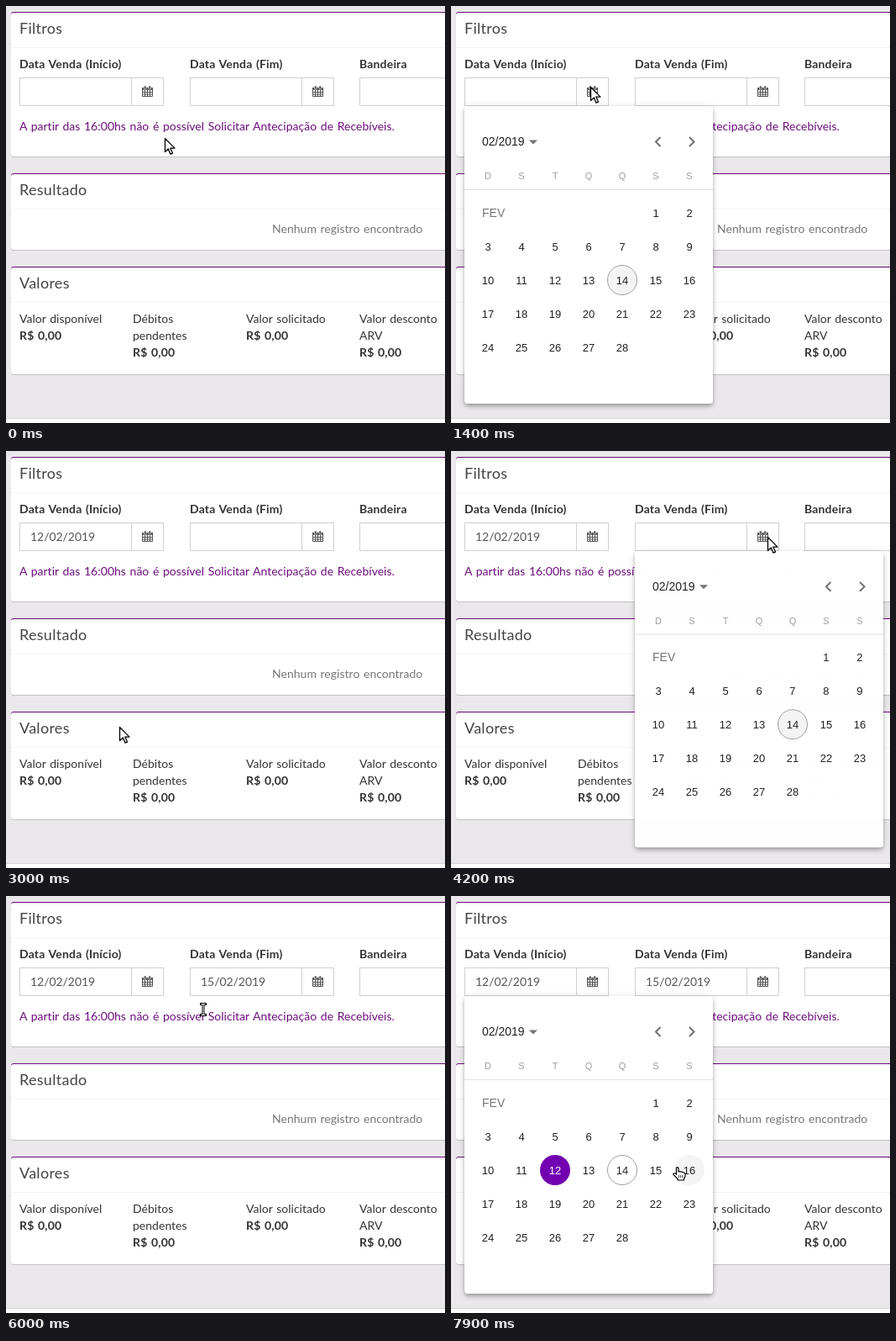
Write an HTML page that moves like this. It is 523 by 496 pixels and loops after 8 s.

```html
<!DOCTYPE html>
<html lang="pt">
<head>
<meta charset="utf-8">
<title>Filtros</title>
<style>
html, body { margin: 0; width: 100%; height: 100%; overflow: hidden; background: #eae8eb; }
svg { display: block; width: 523px; height: 496px; }
text { font: 14px Lato, "Open Sans", sans-serif; fill: #333; letter-spacing: .02px; word-spacing: 1px; white-space: pre; }
.bold { font-weight: 700; letter-spacing: .17px; }
.title { font-size: 18px; fill: #444; letter-spacing: .28px; }
.note { fill: #6c0f7c; }
.mute { fill: #777; }
.value { fill: #555; letter-spacing: -.05px; }
.cal text { font: 13px "Liberation Sans", Arial, sans-serif; fill: #212121; letter-spacing: 0; word-spacing: 0; }
.cal .month { font-size: 14px; }
.cal .week { font-size: 11px; fill: #9e9e9e; }
.cal .name { font-size: 14px; fill: #757575; }
.mid { text-anchor: middle; }
</style>
</head>
<body>
<svg id="stage" viewBox="0 0 523 496"></svg>
<script>
const stage = document.getElementById('stage');

function add(parent, tag, attrs, text) {
  const node = document.createElementNS('http://www.w3.org/2000/svg', tag);
  for (const key in attrs) node.setAttribute(key, attrs[key]);
  if (text) node.textContent = text;
  parent.appendChild(node);
  return node;
}
const rect = (parent, x, y, width, height, fill, more) =>
  add(parent, 'rect', { x, y, width, height, fill, ...more });
const label = (parent, x, y, text, cls = '') => add(parent, 'text', { x, y, class: cls }, text);
const path = (parent, d, more) => add(parent, 'path', { d, fill: 'none', ...more });
const show = (node, on) => node.setAttribute('visibility', on ? 'inherit' : 'hidden');

const defs = add(stage, 'defs');
for (const size of [.5, 2, 2.5, 5]) {
  const blur = add(defs, 'filter', { id: 'blur' + size * 10, x: '-20%', y: '-20%', width: '140%', height: '140%' });
  add(blur, 'feGaussianBlur', { stdDeviation: size });
}

// Page
function panel(top, bottom, title) {
  const shape = { rx: 3 };
  rect(stage, 6, top + 1, 530, bottom - top, '#000', { ...shape, opacity: .16, filter: 'url(#blur5)' });
  rect(stage, 6, top, 530, 8, '#6a0c78', shape);
  rect(stage, 6, top + 1, 530, bottom - top - 1, '#fff', shape);
  rect(stage, 6, top + 42, 530, 1, '#f4f4f4');
  label(stage, 16, top + 26, title, 'title');
}

function icon(x) {
  const g = add(stage, 'g', { transform: `translate(${x} 95)`, fill: '#555' });
  path(g, 'M.5 2.5H12.5V12.5H.5Z M3.5 5V12 M6.5 5V12 M9.5 5V12 M1 7.5H12 M1 10H12',
    { stroke: '#555' });
  rect(g, 0, 2, 13, 3);
  for (const left of [2.5, 8]) rect(g, left, 0, 2.5, 4, '#555', { stroke: '#fff', 'stroke-width': .5 });
}

function field(x, title) {
  label(stage, x, 74, title, 'bold');
  const line = { stroke: '#d0d0d0' };
  rect(stage, x + .5, 85.5, 171, 33, '#fff', line);
  path(stage, `M${x + 133.5} 85V119`, line);
  icon(x + 146);
  return label(stage, x + 13, 107, '', 'value');
}

rect(stage, 0, 0, 523, 496, '#eae8eb');
rect(stage, 0, 490, 523, 6, '#fff');
rect(stage, 0, 490, 523, 1, '#d2d2d8');
panel(7, 179, 'Filtros');
panel(199, 290, 'Resultado');
panel(310, 438, 'Valores');
const startField = field(16, 'Data Venda (Início)');
const endField = field(219, 'Data Venda (Fim)');
field(421, 'Bandeira');
label(stage, 16, 148, 'A partir das 16:00hs não é possível Solicitar Antecipação de Recebíveis.', 'note');
label(stage, 317, 270, 'Nenhum registro encontrado', 'mute');
['Valor disponível', 'Débitos|pendentes', 'Valor solicitado', 'Valor desconto|ARV'].forEach((name, i) => {
  const lines = [...name.split('|'), 'R$ 0,00'];
  lines.forEach((line, j) =>
    label(stage, 16 + 135 * i, 377 + 20 * j, line, j === lines.length - 1 ? 'bold' : ''));
});

// Calendar, drawn from its own top left corner
const cal = add(stage, 'g', { class: 'cal' });
const shadow = (y, inset, size, opacity) => rect(cal, inset, y + inset, 296 - 2 * inset, 354 - 2 * inset, '#000',
  { rx: 4, opacity, filter: `url(#blur${size * 10})` });
shadow(2, 1, 2, .2);
shadow(4, 0, 2.5, .14);
shadow(1, 0, 5, .12);
rect(cal, 0, 0, 296, 354, '#fff', { rx: 4 });
rect(cal, 0, 99, 296, 1, '#e0e0e0');
label(cal, 21, 47, '02/2019', 'month');
path(cal, 'M77 40.5H87L82 45.5Z', { style: 'fill:#757575' });
path(cal, 'M233.5 37L228 42.5L233.5 48M268 37L273.5 42.5L268 48', { stroke: '#707070', 'stroke-width': 2 });
[...'DSTQQSS'].forEach((day, i) => label(cal, 28 + 40 * i, 87, day, 'week mid'));
label(cal, 21, 132, 'FEV', 'name');

const cell = day => ({ cx: 28 + 40 * ((day + 4) % 7), cy: 127 + 40 * Math.floor((day + 4) / 7) });
const disc = (day, fill) => add(cal, 'circle', { ...cell(day), r: 18, fill });
const hover = disc(1, '#f4f4f4');
const today = disc(14, '#f4f4f4');
today.setAttribute('r', 17.5);
today.setAttribute('stroke', '#9e9e9e');
const chosen = disc(12, '#7200b0');
const days = [];
for (let day = 1; day <= 28; day++) {
  const { cx, cy } = cell(day);
  days[day] = label(cal, cx, cy + 5, String(day), 'mid');
}

// Pointers, each with its hot spot at 0,0
const ink = { stroke: '#000', 'stroke-linejoin': 'round' };
const cursor = add(stage, 'g');
const kinds = { arrow: add(cursor, 'g'), hand: add(cursor, 'g', { transform: 'translate(-6 -1)' }), beam: add(cursor, 'g') };
path(kinds.arrow, 'M.5 .5V16.5L4.3 13L7 19.2L9.5 18.1L6.8 12.1H12Z', { ...ink, fill: '#fff', 'stroke-width': 1.3 });
path(kinds.hand, 'M4.5 9V1.8Q4.5 .6 5.7 .6T7 1.8V6Q8 5.3 9 6Q10 5.6 11 6.4Q12 6 13 7Q15 7 15 8.6V11' +
  'Q15 13 13.5 14.3V16H6.2V14.5L1 9.3Q.6 8 1.8 7.8T4.5 9Z', { ...ink, fill: '#fff', 'stroke-width': 1.2 });
path(kinds.hand, 'M7.5 10V13M9.5 10V13M11.5 10V13', { ...ink, 'stroke-width': .7 });
const beam = 'M-2.5 -6.5H2.5M0 -6.5V6.5M-2.5 6.5H2.5';
path(kinds.beam, beam, { ...ink, 'stroke-width': 3, 'stroke-linecap': 'square' });
path(kinds.beam, beam, { stroke: '#fff', 'stroke-width': 1 });

// Pointer moves: first step, last step, x, y
const moves = [
  [400, 400, 188, 152], [600, 700, 166, 96], [1500, 1900, 179, 283], [2100, 2500, 141, 327],
  [2700, 2700, 138, 328], [3000, 3000, 135, 328], [3200, 3200, 154, 302], [3400, 3400, 246, 193],
  [3600, 3800, 377, 102], [4300, 4900, 443, 338], [5000, 5100, 448, 336], [5400, 6000, 235, 135],
  [6200, 6200, 220, 127], [6400, 6600, 168, 100], [7200, 7300, 158, 149], [7500, 7900, 270, 323]
];
// Calendar openings: growth holds between steps, then a short fade at close
const openings = [
  { x: 16, close: 2900, grow: [[1000, .95], [1400, 1]] },
  { x: 219, close: 5300, grow: [[4100, .9], [4200, .996], [4300, 1]] },
  { x: 16, close: 8000, grow: [[6900, .8], [7000, .988], [7200, 1]], picked: true }
];

function pointerAt(t) {
  let x = 189, y = 157;
  for (const [from, to, toX, toY] of moves) {
    if (t < from) break;
    const p = Math.min(1, (t - from + 100) / (to - from + 100));
    const eased = 1 - (1 - p) ** 1.7;
    x += (toX - x) * eased;
    y += (toY - y) * eased;
  }
  return { x: Math.round(x), y: Math.round(y) };
}

function hoveredDay(x, y) {
  const col = Math.floor((x - 8) / 40), row = Math.floor((y - 107) / 40);
  const day = row * 7 + col - 4;
  return col >= 0 && col < 7 && day >= 1 && day <= 28 ? day : 0;
}

function draw(time) {
  const t = Math.floor(time % 8000 / 100) * 100;
  const { x, y } = pointerAt(t);
  const open = openings.find(o => t >= o.grow[0][0] && t < o.close + 100);
  let day = 0;
  show(cal, open);
  if (open) {
    const size = open.grow.filter(step => step[0] <= t).pop()[1];
    const picked = !!open.picked;
    cal.setAttribute('transform', `translate(${open.x} 119) scale(1 ${size})`);
    cal.setAttribute('opacity', t >= open.close ? .5 : size);
    day = hoveredDay(x - open.x, y - 119);
    if (day) for (const [key, value] of Object.entries(cell(day))) hover.setAttribute(key, value);
    today.setAttribute('fill', picked ? '#fff' : '#f4f4f4');
    days[12].style.fill = picked ? '#fff' : '';
    show(chosen, picked);
  }
  show(hover, day);
  startField.textContent = t >= 2900 ? '12/02/2019' : '';
  endField.textContent = t >= 5300 ? '15/02/2019' : '';
  const overText = !open && y > 133 && y < 151 && x < 464;
  const kind = day ? 'hand' : overText ? 'beam' : 'arrow';
  for (const name in kinds) show(kinds[name], name === kind);
  cursor.setAttribute('transform', `translate(${x} ${y})`);
}

const began = performance.now();
function loop() {
  draw(performance.now() - began);
  requestAnimationFrame(loop);
}
draw(0);
requestAnimationFrame(loop);
</script>
</body>
</html>
```
